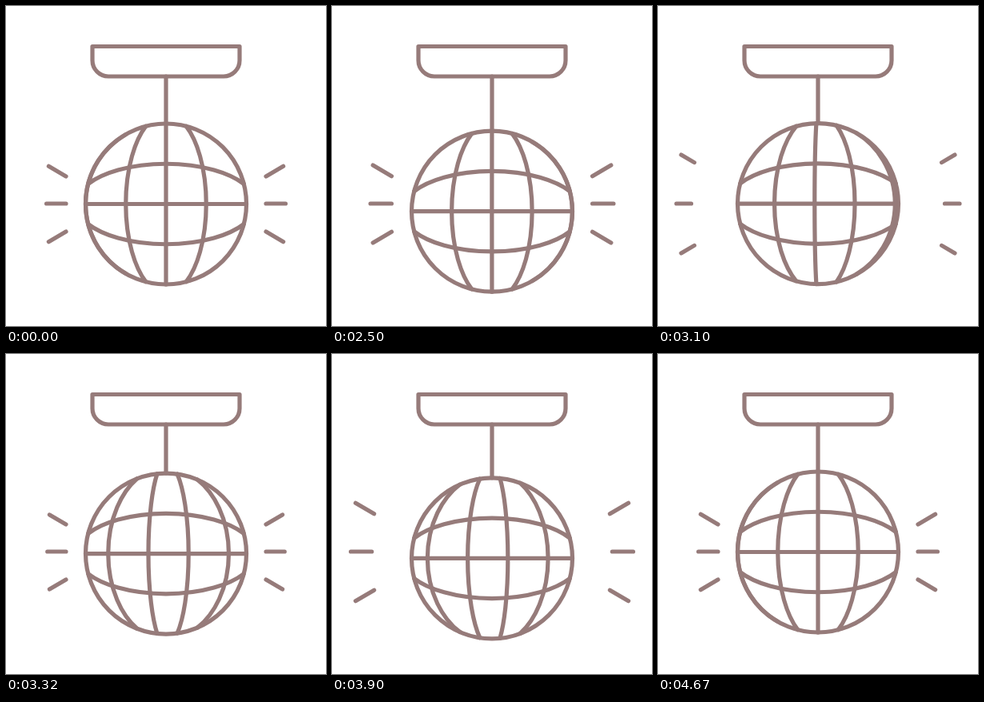
These frames come from a looping animation (400x400 px, 4.7 s). An HTML page:

```html
<!DOCTYPE html>
<html lang="en">
<head>
<meta charset="utf-8">
<title>Disco ball</title>
<style>
  html, body { margin: 0; width: 100%; height: 100%; overflow: hidden; background: #fff; }
  svg { display: block; width: 100%; height: 100%; }
  path, circle { fill: none; stroke: #967b7a; stroke-width: 5.2; stroke-linecap: round; stroke-linejoin: round; }
</style>
</head>
<body>
<svg viewBox="0 0 400 400">
  <path d="M108 50.5H292V68a20 20 0 0 1-20 20H128a20 20 0 0 1-20-20Z"/>
  <path id="rod"/>
  <path id="rays"/>
  <g id="ball">
    <circle r="100.5"/>
    <path id="parallels"/>
    <path id="meridians"/>
  </g>
</svg>
<script>
const LOOP = 4700, HOLD = 2020, START = 1995;
const R = 100.5, CX = 200, CY = 247.5, GAP = R / 2;
const el = id => document.getElementById(id);
const clamp = x => Math.min(1, Math.max(0, x));
const span = (t, a, b) => clamp((t - a) / (b - a));
const smooth = x => x * x * (3 - 2 * x);
const sine = x => (1 - Math.cos(Math.PI * x)) / 2;

// Vertical bob: [time, offset]
const bobKeys = [[0, 0], [600, 9.8], [1140, -0.5], [1700, 9.8], [2400, 0]];
function bob(t) {
  let y = 0;
  for (let i = 1; i < bobKeys.length; i++) {
    const [a, from] = bobKeys[i - 1], [b, to] = bobKeys[i];
    y += (to - from) * sine(span(t, a, b));
  }
  return y;
}

// Grid line whose middle is d away from the centre and whose ends are d / 2 away
function arc(d, upright) {
  const end = Math.sqrt(R * R - d * d / 4), h = d / 2;
  const long = end / Math.sqrt(0.75), w = Math.abs(d);
  if (w < 0.1) return upright ? `M0 ${-end}V${end}` : `M${-end} 0H${end}`;
  return upright
    ? `M${h} ${-end}A${w} ${long} 0 0 ${d > 0 ? 1 : 0} ${h} ${end}`
    : `M${-end} ${h}A${long} ${w} 0 0 ${d < 0 ? 1 : 0} ${end} ${h}`;
}

function meridians(t) {
  const turn = -10 * GAP * sine(span(t, -15, 2525));
  const first = ((turn % GAP) + GAP) % GAP;
  let d = "";
  for (let i = -2; i < 2; i++) d += arc(first + i * GAP, true);
  return d;
}

// Visible parts of a ray, 0 = inner end, 1 = outer end
const REST = 0.47, FIRST = 332, PERIOD = 418, GROW = 340, LAG = 153, BURSTS = 4;
function rayParts(t) {
  const parts = [[smooth(span(t, 0, 350)), REST + (1 - REST) * smooth(span(t, 0, 220))]];
  for (let i = 0; i < BURSTS; i++) {
    const p = t - FIRST - i * PERIOD;
    parts.push([smooth(span(p, LAG, LAG + GROW)), smooth(span(p, 0, GROW))]);
  }
  const back = span(t, FIRST + BURSTS * PERIOD, 2640);
  parts.push([0, REST * (1 - (1 - back) ** 3)]);
  return parts.filter(([a, b]) => b - a > 0.01);
}

// Left side rays: inner x, y, outer x, y
const lines = [[75, 213, 29, 186], [75, 247, 23, 247], [75, 282, 29, 309]];
function rays(t) {
  let d = "";
  for (const [a, b] of rayParts(t))
    for (const [x1, y1, x2, y2] of lines) {
      const at = (k, flip) => {
        const x = x1 + (x2 - x1) * k;
        return `${flip ? 400 - x : x} ${y1 + (y2 - y1) * k}`;
      };
      for (const flip of [false, true]) d += `M${at(a, flip)}L${at(b, flip)}`;
    }
  return d;
}

function draw(ms) {
  const t = ms < HOLD ? -100 : ms - START;
  const y = CY + bob(t);
  el("ball").setAttribute("transform", `translate(${CX} ${y})`);
  el("rod").setAttribute("d", `M${CX} 88V${y - R}`);
  el("meridians").setAttribute("d", meridians(t));
  el("rays").setAttribute("d", rays(t));
}

el("parallels").setAttribute("d", [-GAP, 0, GAP].map(d => arc(d, false)).join(""));
const begin = performance.now();
function tick() {
  draw((performance.now() - begin) % LOOP);
  requestAnimationFrame(tick);
}
tick();
</script>
</body>
</html>
```
